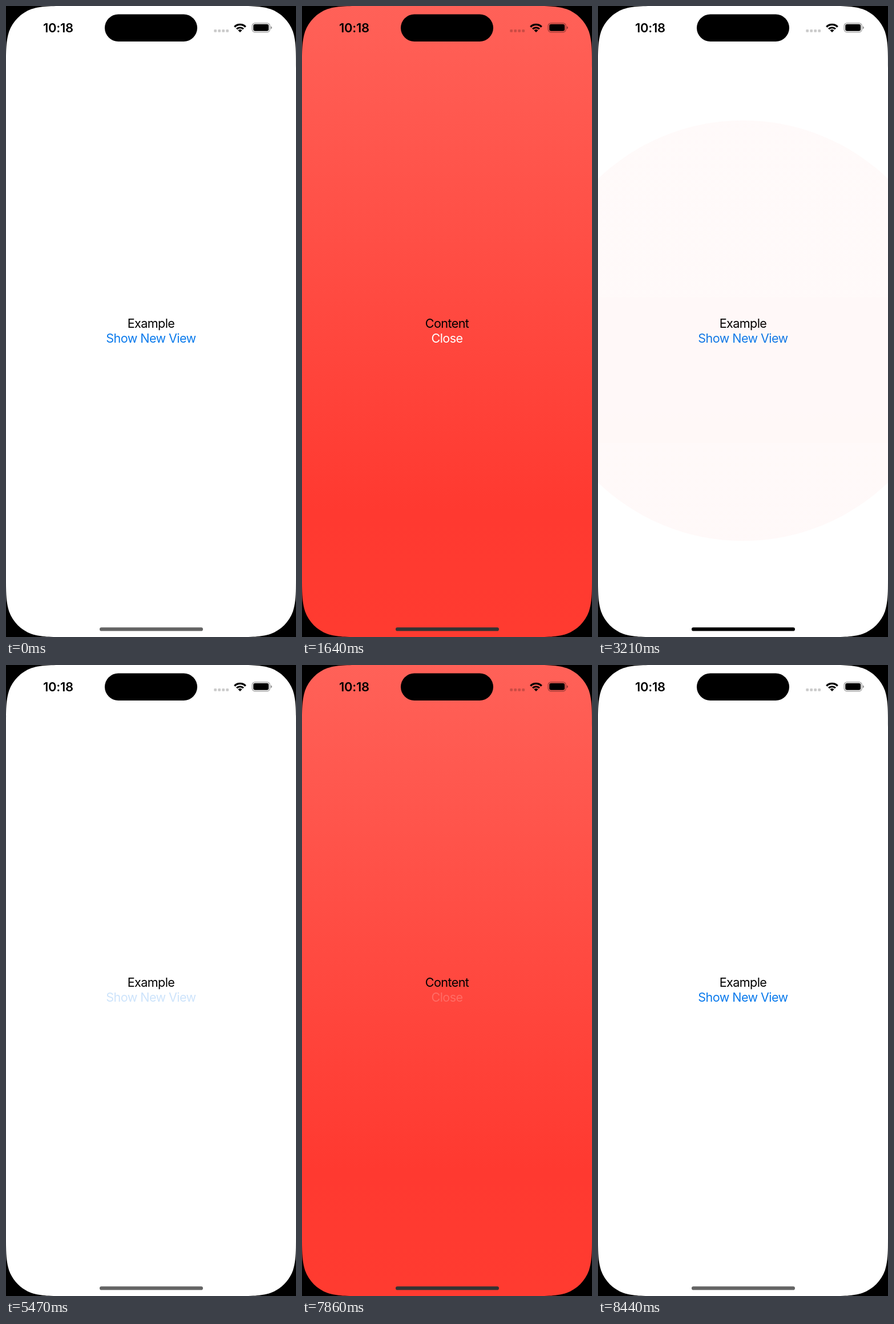
Write an HTML page that moves like this. It is 508 px wide and 1102 px high and loops after 8.47 s.

```html
<!DOCTYPE html>
<html lang="en">
<head>
<meta charset="utf-8">
<style>
  html, body { margin: 0; width: 100%; height: 100%; overflow: hidden; background: #fff; }
  svg { display: block; width: 508px; height: 1102px; }
  text { font: 21.6px Inter, sans-serif; letter-spacing: -.6px; }
  .mid { text-anchor: middle; }
  .clock { font-size: 22px; font-weight: 600; letter-spacing: -.3px; }
</style>
</head>
<body>
<svg viewBox="0 0 508 1102">
  <defs>
    <linearGradient id="red" x2="0" y2="1">
      <stop stop-color="#ff6158"/>
      <stop offset=".8" stop-color="#ff3930"/>
      <stop offset="1" stop-color="#ff3b30"/>
    </linearGradient>
    <clipPath id="iris"><circle id="hole" cx="254" cy="567" r="0"/></clipPath>
    <path id="corner" transform="scale(71)" d="M0 0H1.5287C1.0885 0 .8684 0 .6315 .0749C.3728 .1691 .1691 .3728 .0749 .6315C0 .8684 0 1.0885 0 1.5287Z"/>
  </defs>

  <rect width="508" height="1102" fill="#fff"/>
  <text class="mid" x="254" y="562">Example</text>
  <text class="mid" id="show" x="254" y="588" fill="#0a7aec">Show New View</text>

  <g id="sheet" clip-path="url(#iris)">
    <rect width="508" height="1102" fill="url(#red)"/>
    <text class="mid" x="254" y="562">Content</text>
    <text class="mid" id="close" x="254" y="588" fill="#fff">Close</text>
  </g>

  <text class="clock" x="65" y="46">10:18</text>
  <rect x="173" y="14.5" width="162" height="47.5" rx="23.75"/>
  <g opacity=".2">
    <rect x="364.3" y="41" width="4.8" height="4.8" rx="1.4"/>
    <rect x="371.3" y="41" width="4.8" height="4.8" rx="1.4"/>
    <rect x="378.3" y="41" width="4.8" height="4.8" rx="1.4"/>
    <rect x="385.3" y="41" width="4.8" height="4.8" rx="1.4"/>
  </g>
  <g transform="translate(410 46)">
    <path d="M0 0L-3.5 -3.6A5 5 0 0 1 3.5 -3.6Z"/>
    <path d="M-9.7 -9.5A13.7 13.7 0 0 1 9.7 -9.5M-5.9 -5.8A8.3 8.3 0 0 1 5.9 -5.8" fill="none" stroke="#000" stroke-width="3.2"/>
  </g>
  <rect x="431.2" y="29.8" width="31" height="16" rx="5" fill="none" stroke="#000" stroke-opacity=".4" stroke-width="1.3"/>
  <rect x="433.2" y="31.8" width="27" height="12" rx="3.2"/>
  <path d="M463.8 35.2Q466 36 466 37.8T463.8 40.4Z" opacity=".45"/>
  <rect id="bar" x="164" y="1085.3" width="181" height="6.2" rx="3.1"/>

  <use href="#corner"/>
  <use href="#corner" transform="matrix(-1 0 0 1 508 0)"/>
  <use href="#corner" transform="matrix(1 0 0 -1 0 1102)"/>
  <use href="#corner" transform="matrix(-1 0 0 -1 508 1102)"/>
</svg>
<script>
  const LOOP = 8470, OMEGA = 2 * Math.PI / 0.55;
  const el = id => document.getElementById(id);
  const within = (t, a, b) => t >= a && t < b;

  // Critically damped spring: the share still to travel after ms.
  const rest = ms => {
    const x = OMEGA * ms / 1000;
    return (1 + x) * Math.exp(-x);
  };

  // The screen refreshes in even steps from start to end.
  const stepped = (t, start, end, count) => {
    const step = (end - start) / count;
    return (Math.floor((t - start) / step + 1e-6) + 1) * step;
  };

  // How far the red sheet is presented, 0 to 1.
  function presented(t) {
    if (t < 1110) return 0;
    if (t < 1640) return 1 - rest(stepped(t, 1110, 1640, 7));
    if (t < 2850) return 1;
    if (t < 3210) return rest(stepped(t, 2850, 3210, 4));
    if (t < 5470) return rest(465);
    if (t < 5560) return 0;
    if (t < 6100) return 1 - rest(stepped(t, 5560, 6100, 7));
    if (t < 8040) return 1;
    if (t < 8440) return rest(stepped(t, 8040, 8440, 5));
    return 0;
  }

  function draw(t) {
    const p = presented(t);
    el("sheet").setAttribute("opacity", p);
    el("hole").setAttribute("r", 345 + 715 * p);
    el("show").setAttribute("opacity", within(t, 1020, 1110) || within(t, 5470, 5560) ? .2 : 1);
    el("close").setAttribute("opacity", within(t, 2760, 2850) || within(t, 7860, 8040) ? .2 : 1);
    const shade = within(t, 2850, 5470) ? 0 : Math.round(100 - 49 * p);
    el("bar").setAttribute("fill", `rgb(${shade},${shade},${shade})`);
  }

  const begin = performance.now();
  (function frame() {
    draw((performance.now() - begin) % LOOP);
    requestAnimationFrame(frame);
  })();
</script>
</body>
</html>
```
